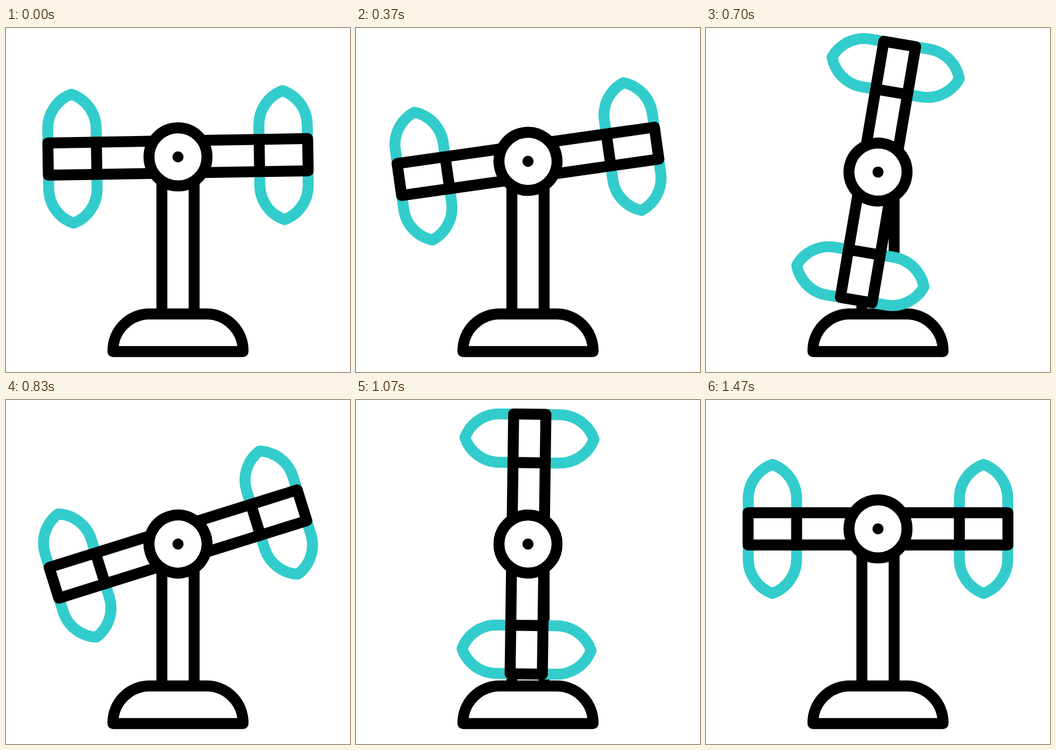
Write an HTML page that moves like this. It is 640x640 px and loops after 1670 ms.

```html
<!DOCTYPE html>
<html lang="en">
<head>
<meta charset="utf-8">
<title>Wind turbine</title>
<style>
  html, body { margin: 0; width: 100%; height: 100%; overflow: hidden; background: #fff; }
  svg { display: block; width: 100vw; height: 100vh; }
  .line { fill: #fff; stroke: #000; stroke-width: 20.4; stroke-linejoin: round; }
  .blade { stroke: #3cc; }
</style>
</head>
<body>
<svg viewBox="0 0 640 640">
  <defs>
    <path id="blade" class="line blade" d="M-45-56A68 68 0 0 1 0-120A68 68 0 0 1 45-56V56A68 68 0 0 1 0 120A68 68 0 0 1-45 56Z"/>
  </defs>
  <path id="pole" class="line"/>
  <path class="line" d="M199 602V600A68 68 0 0 1 267 532H373A68 68 0 0 1 441 600V602Z"/>
  <g id="rotor">
    <use href="#blade" x="-196.4"/>
    <use href="#blade" x="196.4"/>
    <rect class="line" x="-241.7" y="-30" width="483.4" height="60"/>
    <path class="line" d="M-151.4-30V30M151.4-30V30"/>
    <circle class="line" r="54"/>
    <circle r="10.3"/>
  </g>
</svg>
<script>
  const LOOP = 1670, LAST = 44;
  const rotor = document.getElementById('rotor');
  const pole = document.getElementById('pole');

  // Sine ease from 0 to 1 between steps a and b
  function ease(x, a, b) {
    const s = Math.min(1, Math.max(0, (x - a) / (b - a)));
    return (1 - Math.cos(Math.PI * s)) / 2;
  }

  // 30 steps per second on a 10 ms grid, then a rest
  function stepAt(ms) {
    return Math.min(LAST, Math.floor((3 * Math.floor(ms / 10) + 1) / 10));
  }

  function draw(ms) {
    const k = stepAt(ms % LOOP);
    // Small swing back, then one full turn
    const angle = -18 * ease(k, -1.26, 7.2) + 378 * ease(k, 7.2, 43.83);
    const y = 239.8 + 28.2 * (ease(k, 6.3, 19.2) - ease(k, 33.1, 43.83));
    rotor.setAttribute('transform', `translate(320 ${y}) rotate(${angle})`);
    pole.setAttribute('d', `M290 532V${y}H350V532`);
  }

  const start = performance.now();
  function tick() {
    draw(performance.now() - start);
    requestAnimationFrame(tick);
  }
  draw(0);
  requestAnimationFrame(tick);
</script>
</body>
</html>
```
